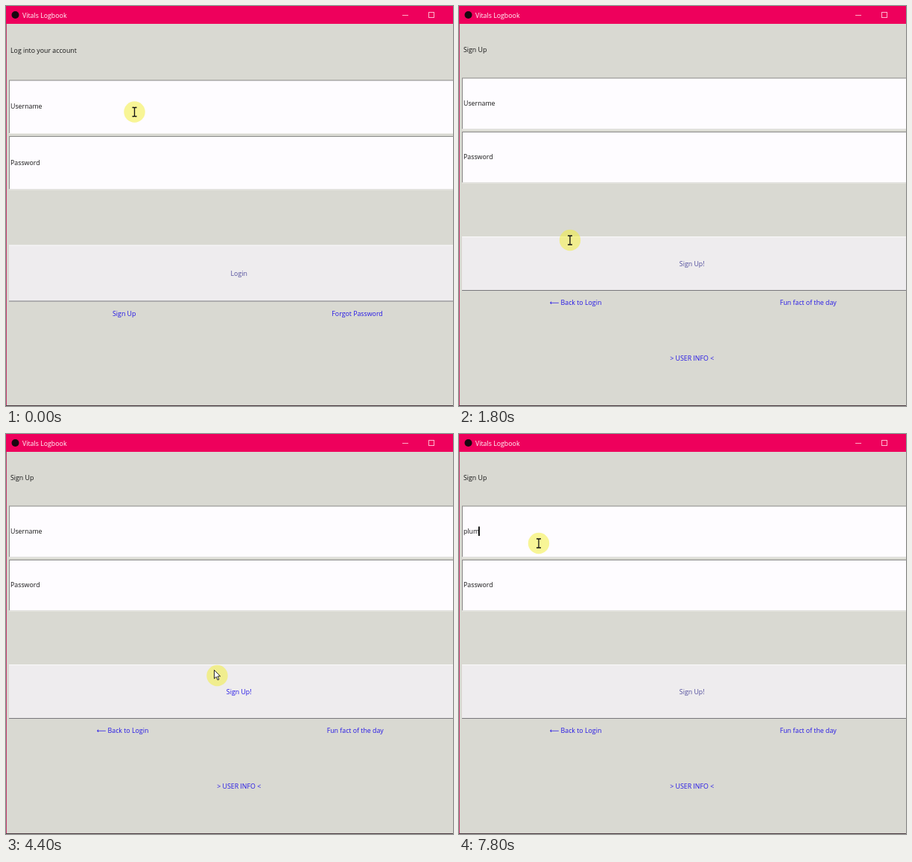
These frames come from a looping animation (600x538 px, 8000 ms). An HTML page:

```html
<!DOCTYPE html>
<html lang="en">
<head>
<meta charset="utf-8">
<title>Vitals Logbook</title>
<style>
  html, body { margin: 0; width: 100%; height: 100%; overflow: hidden; background: #d9d9d2; }
  svg { display: block; width: 100vw; height: 100vh; }
  text { font: 8.8px "Open Sans", "Noto Sans", sans-serif; white-space: pre; }
</style>
</head>
<body>
<svg id="stage" viewBox="0 0 600 538"></svg>
<script>
const stage = document.getElementById('stage');
const LOOP = 8000, STEP = 200;
const BLUE = '#2416e6', MUTED = '#504c9c', INK = '#161616';

// Pointer positions: start ms, halo centre x, y, shape, hovered control
const pointerPath = [
  [0, 172.5, 142.5, 'beam'],
  [200, 170, 210, 'beam'],
  [400, 164, 330, 'arrow', 'action'],
  [600, 152, 422, 'arrow', 'left'],
  [800, 151, 425, 'arrow', 'left'],
  [1000, 151, 424, 'arrow'],
  [1200, 150, 407, 'arrow', 'left'],
  [1400, 148, 205, 'beam'],
  [1600, 148, 156, 'beam'],
  [1800, 149, 315, 'beam'],
  [2000, 148, 350, 'arrow', 'action'],
  [2200, 150, 385, 'arrow', 'action'],
  [2400, 152, 407, 'arrow', 'left'],
  [2600, 210, 410, 'arrow', 'left'],
  [2800, 335, 411, 'arrow', 'right'],
  [3000, 450, 409, 'arrow', 'right'],
  [3200, 428, 440, 'arrow'],
  [3400, 368, 472.5, 'arrow'],
  [3600, 342, 488, 'arrow', 'info'],
  [3800, 322, 458, 'arrow'],
  [4000, 310, 415, 'arrow'],
  [4200, 297, 372, 'arrow', 'action'],
  [4400, 283.5, 325, 'arrow', 'action'],
  [4600, 190, 235, 'beam'],
  [4800, 118, 170, 'beam'],
  [5000, 110, 152, 'beam'],
  [5200, 107, 147, 'beam']
];
const clicks = [800, 5200];

const rect = (x, y, w, h, fill) =>
  `<rect x="${x}" y="${y}" width="${w}" height="${h}" fill="${fill}"/>`;
const label = (text, x, y, fill = INK, anchor = 'start') =>
  `<text x="${x}" y="${y + 3.2}" fill="${fill}" text-anchor="${anchor}">${text}</text>`;
const centred = (text, x, y, fill) => label(text, x, y, fill, 'middle');

const entry = (y, h, text, id = '') =>
  rect(4, y, 596, h, '#8a8a88') + rect(5, y + 1, 595, h - 1, '#fefcff') +
  rect(4, y + h, 596, 1, '#eeeeea') + `<g id="${id}">${label(text, 6, y + h / 2)}</g>`;

const button = (y, h, text, hovered) =>
  rect(4, y, 596, h, '#eeecee') + rect(4, y, 596, 1, '#fafafa') +
  rect(4, y + h - 1, 596, 1, '#77777b') +
  centred(text, 312.7, y + h / 2, hovered ? BLUE : MUTED);

const link = (text, x, y, hovered) => centred(text, x, y, hovered ? MUTED : BLUE);

const titleBar = () =>
  rect(0, 0, 600, 24, '#ee005c') + rect(0, 24, 1, 514, '#c23a6c') +
  rect(0, 537, 600, 1, '#4a3a40') +
  '<circle cx="12.5" cy="12" r="5" fill="#180810"/>' +
  label('Vitals Logbook', 22, 12.8, '#fff') +
  rect(532, 12, 8, 1, '#ffa8c8') +
  '<rect x="567.5" y="8.5" width="7" height="7" fill="none" stroke="#ffb4d0"/>';

function loginPage(hover, pressed) {
  const signUp = pressed
    ? rect(4, 405, 310, 17.5, '#efeeee') + centred('Sign Up', 159.5, 414.3, INK)
    : link('Sign Up', 158.7, 413.5, hover === 'left');
  return label('Log into your account', 6, 60) +
    entry(99.5, 71.5, 'Username') + entry(175, 71.5, 'Password') +
    button(321.5, 76, 'Login', hover === 'action') +
    signUp + link('Forgot Password', 471.5, 413.5, hover === 'right');
}

function signUpPage(hover, username) {
  return label('Sign Up', 6, 58.8) +
    entry(96.5, 69, username, 'username') + entry(169, 68.5, 'Password') +
    button(310, 73, 'Sign Up!', hover === 'action') +
    link('⟵ Back to Login', 156.5, 399, hover === 'left') +
    link('Fun fact of the day', 468.7, 399, hover === 'right') +
    link('&gt; USER INFO &lt;', 312.7, 473.7, hover === 'info');
}

function pointer(t, x, y, shape) {
  const [hotX, hotY] = shape === 'beam' ? [x, y] : [x - 4, y - 7.5];
  const age = Math.min(...clicks.map(c => t >= c ? t - c : Infinity));
  const ring = age < 400
    ? `<circle cx="${hotX + 1}" cy="${hotY + 1.5}" r="${6 + age / 40}" fill="none" stroke="#d98a1c" stroke-width="1.4"/>`
    : '';
  const icon = shape === 'beam'
    ? '<path d="M-3-6H-.8L0-5.4.8-6H3M0-5.5V5.5M-3 6H-.8L0 5.4.8 6H3" fill="none" stroke="#111" stroke-width="1.3"/>'
    : '<path d="M0 0V11.5L2.7 9 4.6 13.4 6.4 12.6 4.5 8.4H8.2Z" fill="#fff" stroke="#111" stroke-width=".9"/>';
  return `<circle cx="${x}" cy="${y}" r="14.2" fill="#f2ee36" fill-opacity=".52"/>` +
    ring + `<g transform="translate(${hotX} ${hotY})">${icon}</g>`;
}

function typedName(t) {
  if (t < 5200) return 'Username';
  return t < 7600 ? '' : t < 7800 ? 'pl' : 'plum';
}

const caretVisible = t =>
  t >= 5200 && !(t >= 5800 && t < 6000) && !(t >= 6600 && t < 7000);

function draw(t) {
  const [, x, y, shape, hover] = pointerPath.findLast(p => p[0] <= t);
  const page = t < 1000 ? loginPage(hover, t >= 800) : signUpPage(hover, typedName(t));
  stage.innerHTML = rect(0, 0, 600, 538, '#d9d9d2') + page + titleBar() + pointer(t, x, y, shape);
  if (caretVisible(t)) {
    const field = document.getElementById('username');
    const width = field.querySelector('text').getComputedTextLength();
    field.innerHTML += rect(5 + Math.round(width), 124.5, 1.8, 12.5, '#000');
  }
}

let shown = -1;
const start = performance.now();
function tick() {
  const elapsed = (performance.now() - start) % LOOP;
  const t = Math.floor(elapsed / STEP) * STEP;
  if (t !== shown) draw(shown = t);
  requestAnimationFrame(tick);
}
tick();
</script>
</body>
</html>
```
